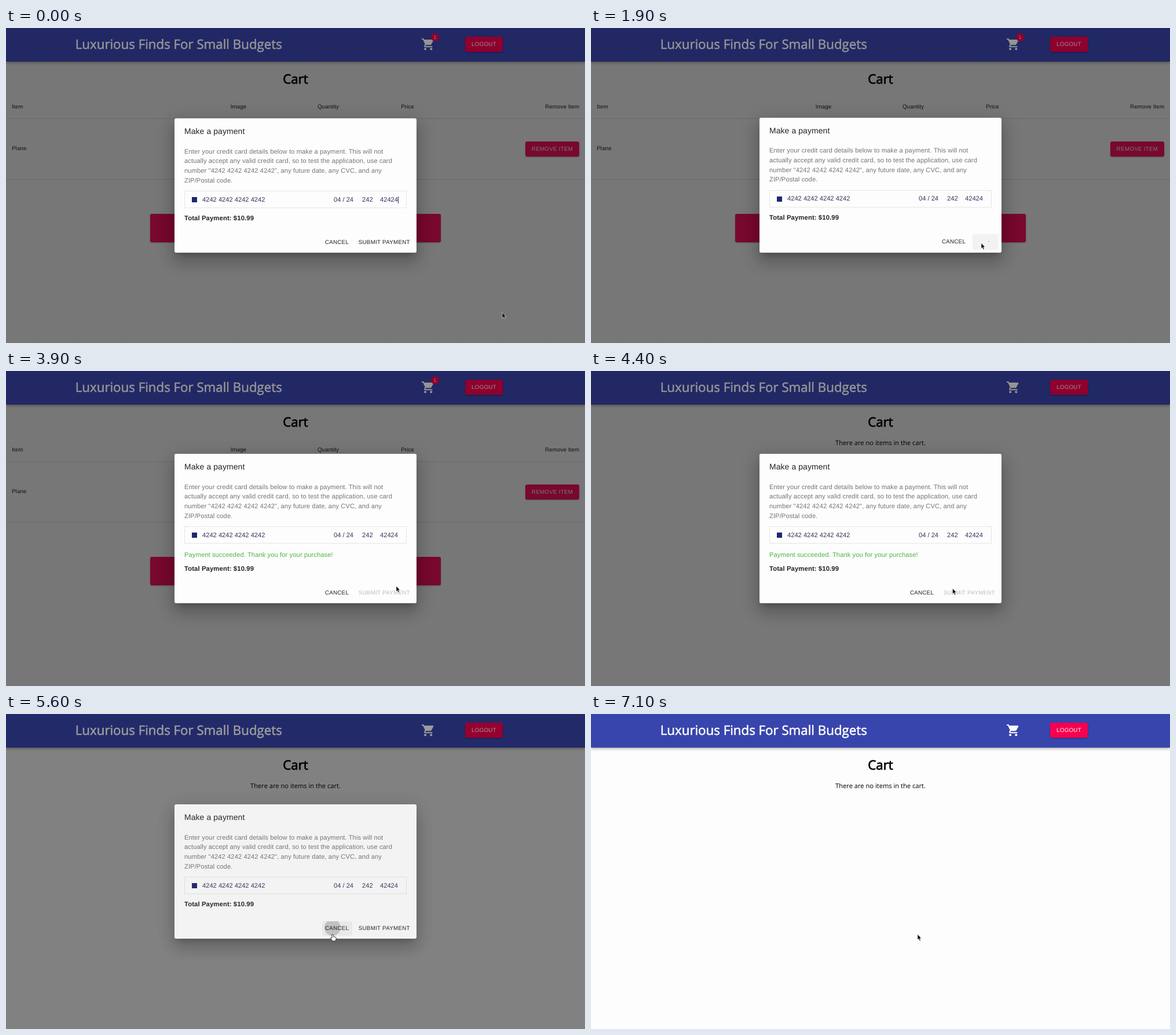
An HTML page that plays this animation: 1000x544 px, repeating every 7400 ms.

```html
<!DOCTYPE html>
<html lang="en">
<head>
<meta charset="utf-8">
<title>Cart payment</title>
<style>
  html, body { margin: 0; width: 100%; height: 100%; overflow: hidden; background: #fdfdfd; }
  body { position: relative; font: 9.75px "Liberation Sans", Arial, sans-serif; letter-spacing: .0107em;
         color: rgba(0,0,0,.87); text-rendering: geometricPrecision; }
  div, svg, b { position: absolute; box-sizing: border-box; }
  /* Labels: left/top is the vertical middle of the line */
  .t { line-height: 0; white-space: nowrap; left: var(--x); top: var(--y); }
  .mid { transform: translateX(-50%); }
  .open { font-family: "Open Sans", sans-serif; letter-spacing: 0; color: #000; }
  .h1 { font-size: 22.29px; -webkit-text-stroke: .8px; }
  .p { font-size: 11.15px; letter-spacing: .0094em; }
  .btn { display: flex; align-items: center; justify-content: center; border-radius: 3px;
         letter-spacing: .0286em; white-space: nowrap; overflow: hidden; }
  .red { background: #ff1062; color: #fff; box-shadow: 0 1px 2px #0003, 0 1px 3px #0002; }
  #header { left: 0; top: 0; width: 1000px; height: 57.6px; background: #3845ad;
            box-shadow: 0 1px 3px -1px #0004, 0 3px 4px #0002, 0 1px 7px #0002; }
  #header .h1 { color: #fff; -webkit-text-stroke-width: .6px; }
  #logout { left: 793px; top: 15.3px; width: 65px; height: 25.5px; background: #f6004f; }
  #badge { left: 734px; top: 9px; width: 14px; height: 14px; border-radius: 50%; background: #f6004f;
           color: #fff; font-size: 8.4px; line-height: 14px; text-align: center; }
  .rule { left: 0; width: 1000px; height: 1px; background: #dedede; }
  #backdrop { inset: 0; background: linear-gradient(rgba(0,0,0,.42) 57.6px, rgba(0,0,0,.53) 57.6px); }
  #dialog { left: 291px; width: 418px; background: #fdfdfd; border-radius: 3px;
            box-shadow: 0 8px 10px -5px #0003, 0 17px 26px 2px #00000024, 0 6px 32px 6px #0000001f; }
  #field { left: 17px; top: 125px; width: 384px; height: 30px; border: 1px solid #e6e6e6; color: #32325d; }
  #field .t { letter-spacing: 0; top: 14.5px; }
  #mark { left: 12px; top: 10px; width: 9px; height: 9px; background: #20266f; }
  #caret { left: 368px; top: 9px; width: 1px; height: 12px; background: #32325d; }
  .ripple { border-radius: 50%; background: rgba(0,0,0,.18); transform: translate(-50%, -50%); }
  #spinner { left: 15px; top: 4px; width: 14px; height: 14px; }
  svg { overflow: visible; }
</style>
</head>
<body>
<div id="header">
  <div class="t open h1" style="--x:119.8px;--y:28px">Luxurious Finds For Small Budgets</div>
  <svg style="left:717px;top:15.5px" width="24.4" height="24.4" viewBox="0 0 24 24" fill="#fff"><path d="M7 18c-1.1 0-1.99.9-1.99 2S5.9 22 7 22s2-.9 2-2-.9-2-2-2zM1 2v2h2l3.6 7.59-1.35 2.45c-.16.28-.25.61-.25.96 0 1.1.9 2 2 2h12v-2H7.42c-.14 0-.25-.11-.25-.25l.03-.12.9-1.63h7.45c.75 0 1.41-.41 1.75-1.03l3.58-6.49c.08-.14.12-.31.12-.48 0-.55-.45-1-1-1H5.21l-.94-2H1zm16 16c-1.1 0-1.99.9-1.99 2s.89 2 1.99 2 2-.9 2-2-.9-2-2-2z"/></svg>
  <div id="badge">1</div>
  <div id="logout" class="btn red">LOGOUT</div>
</div>

<div class="t open h1 mid" style="--x:500px;--y:88px">Cart</div>
<div id="empty" class="t open mid" style="--x:500px;--y:125.4px;font-size:11.15px">There are no items in the cart.</div>
<div id="items">
  <div class="t" style="--x:10px;--y:137px">Item</div>
  <div class="t mid" style="--x:401.5px;--y:137px">Image</div>
  <div class="t mid" style="--x:556.5px;--y:137px">Quantity</div>
  <div class="t mid" style="--x:693.5px;--y:137px">Price</div>
  <div class="t" style="--x:931px;--y:137px">Remove Item</div>
  <div class="rule" style="top:156px"></div>
  <div class="t" style="--x:10px;--y:209px">Plane</div>
  <div class="btn red" style="left:897px;top:196px;width:93px;height:26px">REMOVE ITEM</div>
  <div class="rule" style="top:261px"></div>
  <div class="btn red" style="left:249px;top:321px;width:502px;height:49px"></div>
</div>

<div id="backdrop"></div>
<div id="dialog">
  <div class="t" style="--x:17px;--y:22px;font-size:13.93px;letter-spacing:.0075em">Make a payment</div>
  <div class="t p" style="--x:17px;--y:58px;line-height:16.7px;margin-top:-8.35px;color:rgba(0,0,0,.54)">Enter your credit card details below to make a payment. This will not<br>actually accept any valid credit card, so to test the application, use card<br>number "4242 4242 4242 4242", any future date, any CVC, and any<br>ZIP/Postal code.</div>
  <div id="field">
    <div id="mark"></div>
    <div class="t p" style="--x:30px">4242 4242 4242 4242</div>
    <div class="t p" style="--x:257px">04 / 24</div>
    <div class="t p" style="--x:306px">242</div>
    <div class="t p" style="--x:337px">42424</div>
    <div id="caret"></div>
  </div>
  <div id="success" class="t p" style="--x:17px;--y:174.5px;color:#4bb543">Payment succeeded. Thank you for your purchase!</div>
  <b id="total" class="t p" style="--x:17px;font-size:11.3px">Total Payment: $10.99</b>
  <div id="cancel" class="btn">CANCEL<div class="ripple"></div></div>
  <div id="submit" class="btn"><span id="submitLabel">SUBMIT PAYMENT</span>
    <svg id="spinner" viewBox="0 0 44 44"><circle cx="22" cy="22" r="20.2" fill="none" stroke="#3845ad" stroke-width="3.6"/></svg>
    <div class="ripple"></div>
  </div>
</div>

<svg id="cursor" style="left:0;top:0" width="1" height="1">
  <path id="arrow" d="M0 0V9.4L2.1 7.5 3.7 11.2 5.3 10.5 3.8 6.9H6.6Z" fill="#000" stroke="#fff" stroke-width=".6"/>
  <path id="hand" d="M-1.2.8Q0-.9 1.2.8V4L5.4 5Q6.6 5.6 6.2 8L5 11.5H0L-3.6 7Q-3.6 5.4-1.2 6.6Z" fill="#fff" stroke="#222" stroke-width=".9"/>
</svg>

<script>
const LOOP = 7400, STEP = 100;
const PRESS_SUBMIT = 1680, LOADING = 1850, SUCCESS = 3700, EMPTIED = 3980,
      PRESS_CANCEL = 5435, CLOSE = 5592, CLOSED = 5701;

const el = id => document.getElementById(id);
const clamp = v => Math.min(1, Math.max(0, v));
const smooth = v => { v = clamp(v); return v * v * (3 - 2 * v); };
const lerp = (a, b, k) => a + (b - a) * k;
const show = (id, on) => el(id).style.display = on ? '' : 'none';

function placeButton(id, left, top, width, height, hovered) {
  Object.assign(el(id).style, {
    left: left + 'px', top: top + 'px', width: width + 'px', height: height + 'px',
    background: hovered ? 'rgba(0,0,0,.045)' : 'none'
  });
}

function drawRipple(id, x, y, age) {
  const size = age > 0 && age < 400 ? age * .17 : 0;
  Object.assign(document.querySelector(`#${id} .ripple`).style,
    { left: x + 'px', top: y + 'px', width: size + 'px', height: size + 'px' });
}

function drawSpinner(age) {
  const p = (age % 1400) / 1400;
  const grow = smooth(p * 2), slide = smooth(p * 2 - 1);
  const circle = document.querySelector('#spinner circle');
  circle.style.strokeDasharray = `${lerp(1, 100, grow)} 200`;
  circle.style.strokeDashoffset = -15 * grow - 110 * slide;
  el('spinner').style.transform = `rotate(${p * 360}deg)`;
}

function cursorAt(t) {
  const first = smooth((t - 400) / 1200), second = smooth((t - 4050) / 750);
  return [lerp(lerp(857, 674, first), 564, second), lerp(lerp(491.5, 371.5, first), 380.5, second)];
}

function draw(t) {
  const loading = t >= LOADING && t < SUCCESS;
  const done = t >= SUCCESS && t < CLOSE;
  const opacity = clamp((CLOSED - t) / (CLOSED - CLOSE));
  const open = t < CLOSED - 1;
  const empty = t >= EMPTIED;

  show('items', !empty);
  show('empty', empty);
  el('badge').style.transform = `scale(${1 - smooth((t - EMPTIED) / 195)})`;

  const top = done ? 143 : loading ? 154.7 : 156;
  const height = done ? 258 : loading ? 233.5 : 231.5;
  const buttonHeight = loading ? 27 : 25;
  const buttonTop = (done ? 240 : loading ? 215.3 : 214) - buttonHeight / 2;
  const submitWidth = loading ? 44.5 : 99.5;
  const submitLeft = 412 - submitWidth, cancelLeft = submitLeft - 58;

  el('backdrop').style.opacity = el('dialog').style.opacity = opacity;
  el('dialog').style.top = top + 'px';
  el('dialog').style.height = height + 'px';
  el('total').style.top = (done ? 199 : 173) + 'px';
  show('success', done);
  show('caret', t < PRESS_SUBMIT && t % 1000 < 500);
  show('submitLabel', !loading);
  show('spinner', loading);
  el('submit').style.color = done ? 'rgba(0,0,0,.26)' : '';
  drawSpinner(Math.max(0, t - LOADING));

  const [x, y] = cursorAt(t);
  const over = (left, width) => open && x >= 291 + left && x <= 291 + left + width &&
    y >= top + buttonTop && y <= top + buttonTop + buttonHeight;
  const overCancel = over(cancelLeft, 52);
  const overSubmit = !loading && !done && over(submitLeft, submitWidth);
  const fadingHover = loading && t < LOADING + 200;
  placeButton('cancel', cancelLeft, buttonTop, 52, buttonHeight, overCancel);
  placeButton('submit', submitLeft, buttonTop, submitWidth, buttonHeight, overSubmit || fadingHover);
  drawRipple('submit', 70, 14, t < LOADING ? t - PRESS_SUBMIT : 0);
  drawRipple('cancel', 18, 11, t - PRESS_CANCEL);

  el('cursor').style.transform = `translate(${x}px, ${y}px)`;
  show('hand', overCancel || overSubmit);
  show('arrow', !(overCancel || overSubmit));
}

const start = performance.now();
function tick() {
  const t = (performance.now() - start) % LOOP;
  draw(Math.floor(t / STEP) * STEP);
  requestAnimationFrame(tick);
}
tick();
</script>
</body>
</html>
```
